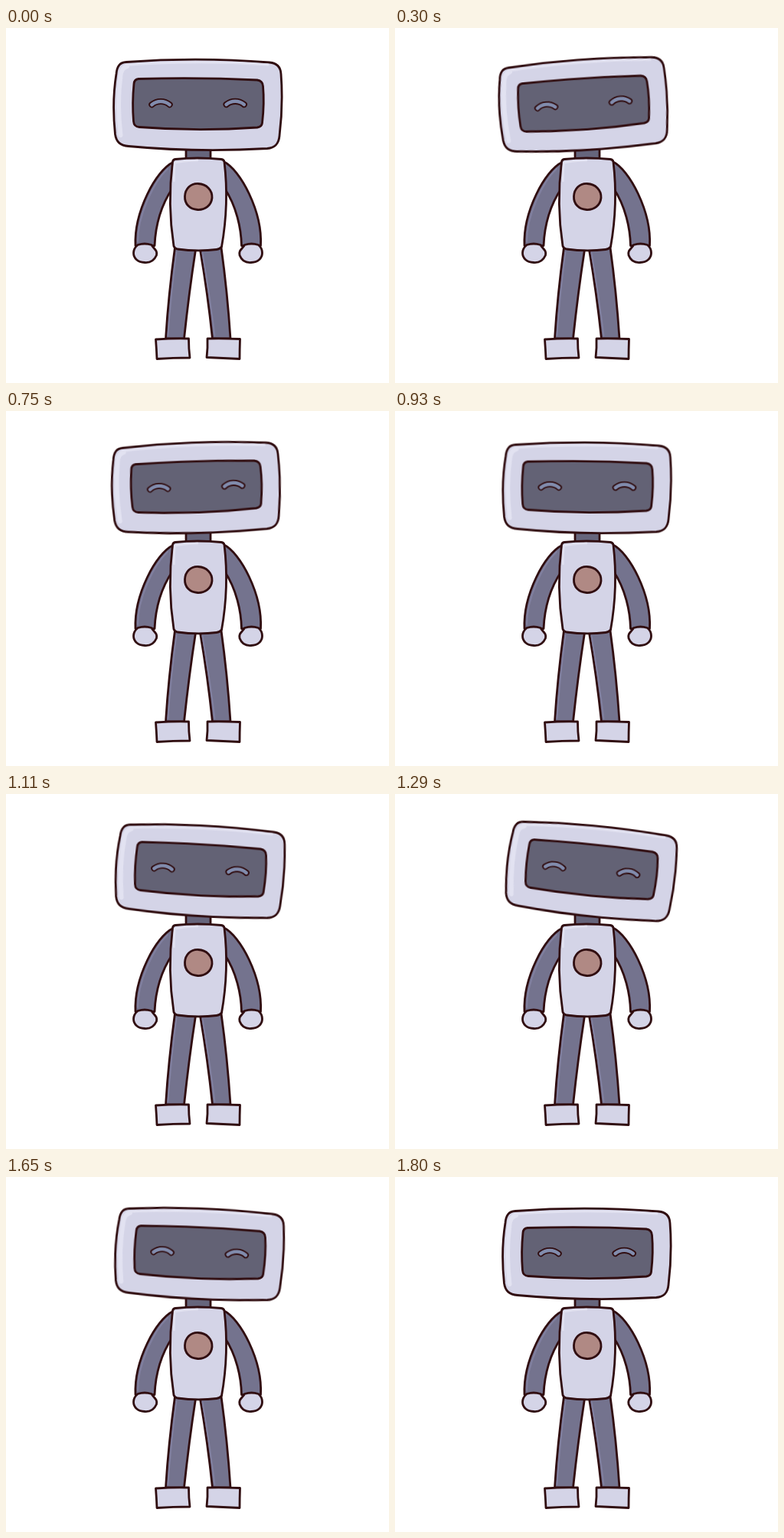
Write an HTML page that moves like this. It is 500 px wide and 464 px high and loops after 1.83 s.

```html
<!DOCTYPE html>
<html lang="en">
<head>
<meta charset="utf-8">
<title>Robot tilting its head</title>
<style>
  html, body { margin: 0; width: 100%; height: 100%; overflow: hidden; background: #fff; }
  svg { display: block; width: 100%; height: 100%; }
  .ink { stroke: #300d10; stroke-width: 2.8; stroke-linejoin: round; stroke-linecap: round; }
  .shell { fill: #d4d4e7; }
  .limb { fill: #74738e; }
  .neck { fill: #66657c; }
  .screen { fill: #636275; }
  .glow { fill: none; stroke: #e2e2f1; stroke-linecap: round; stroke-linejoin: round; }
  .sheen { fill: none; stroke: #8180a0; stroke-width: 2; stroke-linecap: round; }
  .eye { fill: none; stroke: #300d10; stroke-width: 8.2; stroke-linecap: round; }
  .eye.lit { stroke: #818cad; stroke-width: 4.6; }

  /* Moves once per 30 ms; the last 30 ms rest upright. */
  .head {
    transform-origin: 250.5px 160px;
    animation: tilt 1830ms -2ms infinite;
  }
  @keyframes tilt {
    0%        { transform: rotate(0deg);    animation-timing-function: steps(15); }
    24.59016% { transform: rotate(-6.5deg); animation-timing-function: steps(30); }
    73.77049% { transform: rotate(6.2deg);  animation-timing-function: steps(15); }
    98.36066%, 100% { transform: rotate(0deg); }
  }
</style>
</head>
<body>
<svg viewBox="0 0 500 464" preserveAspectRatio="none">
  <defs>
    <path id="eye" d="M-11.6 2.2 C-5 -3.400 5 -3.400 11.6 2.2"/>
  </defs>

  <!-- legs -->
  <path class="ink limb" d="M220.500 287 Q212 350 208.500 406 H232.500 Q239 345 247.500 290Z"/>
  <path class="ink limb" d="M253.500 290 Q263 345 269.500 406 H293 Q289 345 281 287Z"/>
  <path class="sheen" d="M222.500 293 Q215 350 211.500 402 M256.500 294 Q266 350 272.500 402"/>

  <!-- feet -->
  <path class="ink shell" d="M195.500 407 Q217 405.500 238.500 406 Q238.500 419 240 431 Q218 431 197 432.500 Q196.500 420 195.500 407Z"/>
  <path class="ink shell" d="M263 406 Q285 405.500 305.500 406.500 Q305 420 305 432.500 Q283 431.500 262 430.500 Q263.500 418 263 406Z"/>

  <!-- arms -->
  <path class="ink limb" d="M218 175.500 C196 186 167 240 169 284.500 H194 C195 262 201 234 217 210Z"/>
  <path class="ink limb" d="M284 174.500 C306 185 335 240 332.500 284.500 H307.500 C307 262 301 233 285 209Z"/>
  <path class="sheen" d="M211 184 C192 202 172 246 172 279"/>

  <!-- hands -->
  <path class="ink shell" d="M172 283.500 Q181 280.500 190 283.500 C193 289 198 290 196.500 297 C193 305 187 307 181 306.500 C172 306 166.500 301 166.500 294 C166.500 289 169 286 172 283.500Z"/>
  <path class="ink shell" d="M329.500 283.500 Q320.500 280.500 311.500 283.500 C308.500 289 303.500 290 305 297 C308 305 314 307 320 306.500 C329 306 334.500 301 334.500 294 C334.500 289 332.500 286 329.500 283.500Z"/>

  <!-- torso -->
  <path class="ink neck" d="M235 150 H267 V173 H235Z"/>
  <path class="ink shell" d="M221 171.500 Q250 168.500 281 171.500 Q284.500 172 285 175 Q291.500 230 281.500 286 Q279 289 275 289.500 Q250 292.500 224 289 Q220 288 219 285 Q210.500 230 217.500 175 Q218 172 221 171.500Z"/>
  <path class="glow" stroke-width="2.500" d="M219.500 200 Q219 187 220.500 176 Q234 173.500 250 173"/>
  <path class="ink" fill="#b08984" d="M251 203.500 C262 204 269.500 212 269 222 C268 232 260 238 250 237.500 C240 237 233 230 233.500 220 C234 210 241 203 251 203.500Z"/>

  <g class="head">
    <path class="ink shell" d="M157 44.500 Q250 37.500 344 45 C354 46 358.500 51 359 60 Q362 100 357 141 C356 152 351 156.500 341 157.500 Q250 163 160 154.500 C149 153.500 144 149 142.500 139 Q138 97 144 60 C145 49 149 45 157 44.500Z"/>
    <path class="glow" stroke-width="6" d="M149.500 140 Q144.500 98 149.500 62 Q150.500 52 158 50"/>
    <path class="glow" stroke-width="3" d="M156 48.500 Q250 41.500 342 48"/>
    <path class="ink screen" d="M173 66.500 Q250 64 328 68 Q335 69 335.500 76 Q337.500 98 334.500 124 Q334 129 328 130 Q250 135.500 174 129.500 Q167 129 166.500 122 Q164.500 98 167 73 Q167.500 67 173 66.500Z"/>
    <g transform="translate(202 98)">
      <use href="#eye" class="eye"/><use href="#eye" class="eye lit"/>
    </g>
    <g transform="translate(299.200 97.800)">
      <use href="#eye" class="eye"/><use href="#eye" class="eye lit"/>
    </g>
  </g>
</svg>
</body>
</html>
```
